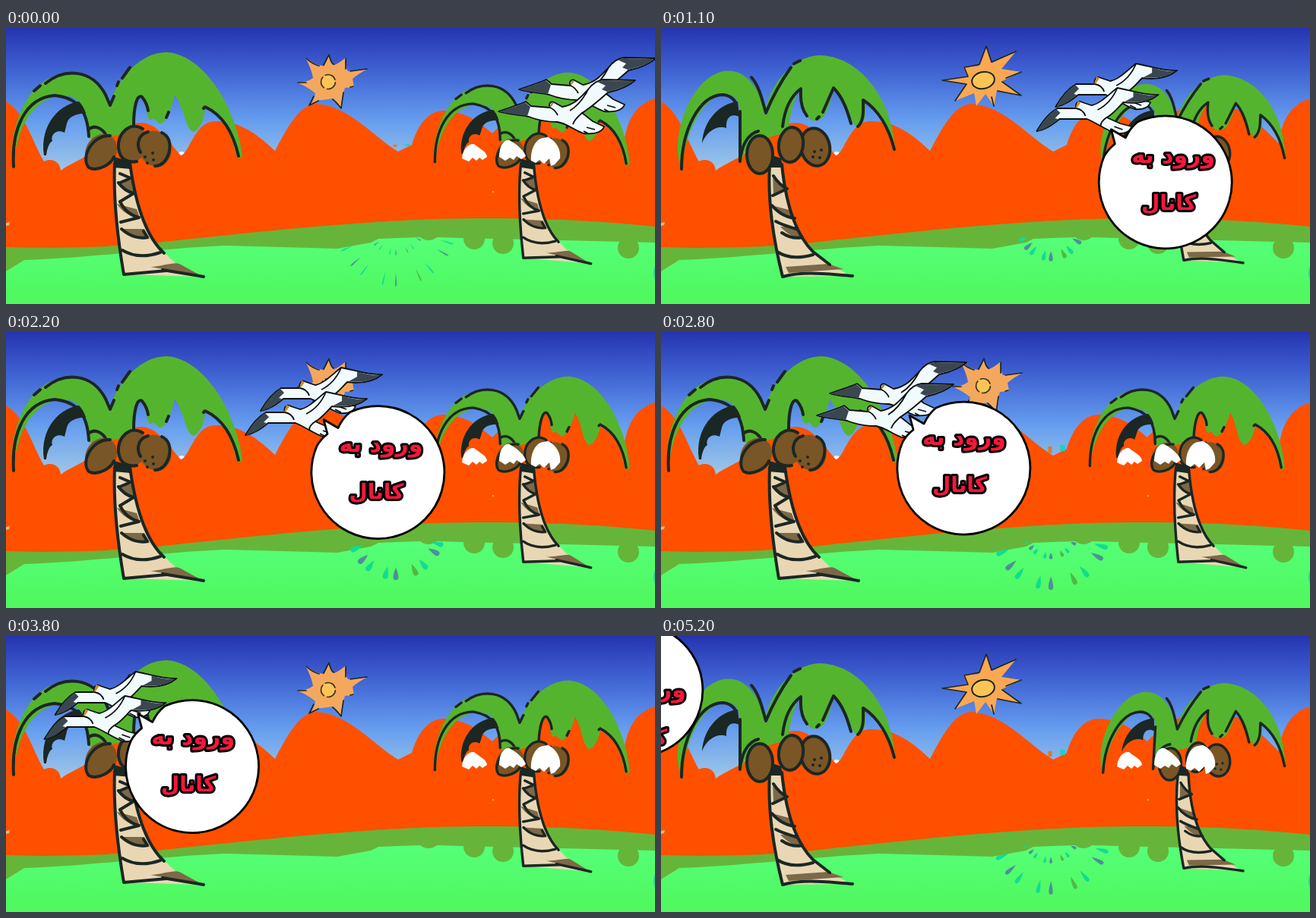
An HTML page for the animation above (5.3 s loop, 854 px wide and 364 px high).

```html
<!DOCTYPE html>
<html lang="fa">
<head>
<meta charset="utf-8">
<title>Palm landscape</title>
<style>
html, body { margin: 0; width: 100%; height: 100%; overflow: hidden; background: #53fe6a; }
svg { display: block; width: 100%; height: 100%; }
.ink { fill: none; stroke: #1b2724; stroke-width: 4; stroke-linecap: round; stroke-linejoin: round; }
.thin { stroke-width: 1.7; }
.leaf { fill: #55b42e; }
.dark { fill: #1b2724; }
.nut { fill: #7a5525; }
.trunk { fill: #e9d7b4; }
.band { fill: #7d6848; }
.bird { fill: #f1fafc; stroke: #0b0f10; stroke-width: 1.8; stroke-linejoin: round; }
.tip { fill: #3b4750; }
.line { fill: none; }
.words { font: bold 30px "DejaVu Sans", sans-serif; fill: #f5173c; stroke: #000; stroke-width: 6px;
  stroke-linejoin: round; paint-order: stroke; text-anchor: middle; direction: rtl; }
.words .small { font-size: 28px; }
</style>
</head>
<body>
<svg viewBox="0 0 854 364" preserveAspectRatio="none">
<defs>
  <linearGradient id="sky" gradientUnits="userSpaceOnUse" x1="0" y1="0" x2="0" y2="190">
    <stop offset="0" stop-color="#2634b0"/>
    <stop offset=".3" stop-color="#4063d3"/>
    <stop offset=".65" stop-color="#669eef"/>
    <stop offset="1" stop-color="#a0c8e6"/>
  </linearGradient>
  <linearGradient id="grass" x1="0" y1="0" x2="0" y2="1">
    <stop offset="0" stop-color="#55ff78"/>
    <stop offset="1" stop-color="#4ff85c"/>
  </linearGradient>
  <clipPath id="lawn"><rect x="400" y="277" width="230" height="87"/></clipPath>

  <g id="tree0">
    <path class="dark" d="M50 168C44 128 70 98 102 96L106 113C94 112 82 117 80 126L77 138C66 132 58 142 61 149C56 152 54 160 53 168Z"/>
    <path class="leaf" d="M10 183C2 150 18 96 45 74C75 50 118 54 137 100C146 66 178 32 211 32C260 34 302 104 311 167C310 174 304 173 303 168C296 135 280 108 262 104C262 120 254 136 246 137C236 132 234 104 222 88C219 104 212 124 204 126C197 126 197 116 191 121C184 120 186 104 178 92C168 94 168 118 168 133C150 142 130 146 110 146C109 118 104 96 84 90C40 84 14 128 10 183Z"/>
    <path class="trunk" d="M143 178L163 178C168 215 180 268 204 292L228 315L260 328L155 325C148 280 140 225 143 178Z"/>
    <path class="band" d="M147 203C155 214 164 217 169 218L166 200ZM146 232C155 246 169 250 176 250L172 239ZM152 265C164 276 178 280 189 278L182 265ZM190 315C206 314 222 308 228 311L259 328L228 322Z"/>
    <path class="ink" d="M143 178C141 225 147 278 155 325L211 320M163 178C170 230 184 275 208 297M206 319L260 328M145 180L160 178M148 204C155 214 164 217 168 218L150 229C157 243 167 248 175 250L151 256M152 265C164 276 177 278 186 276L181 268M153 293C168 302 186 302 203 296M150 192L164 198L150 204"/>
    <path class="ink" d="M10 183C7 135 24 92 64 89C94 92 107 108 109 143M37 83L45 76M52 73C75 54 112 52 131 88L137 102L142 90M146 76L148 71M153 66L163 52M168 128C168 106 172 86 179 91C184 97 186 102 187 109M211 118L214 111M260 106L262 104C288 116 300 142 306 169M108 134C118 126 128 134 132 142"/>
    <ellipse class="nut" cx="125" cy="163" rx="20" ry="24" transform="rotate(28 125 163)"/>
    <ellipse class="nut" cx="196" cy="159" rx="21" ry="24" transform="rotate(-25 196 159)"/>
    <ellipse class="nut" cx="166" cy="153" rx="20" ry="24" transform="rotate(12 166 153)"/>
    <path class="ink" d="M137 142C115 140 97 170 109 184C120 190 138 180 142 170M180 133C163 122 146 140 148 158C150 174 160 178 172 176M187 137C174 140 171 154 177 164M205 138C214 142 218 152 214 166C210 177 204 182 196 182M183 170L183 170M193 165L193 165M194 174L194 174M186 178L186 178"/>
    <path class="dark" d="M142 170L164 176L164 186L142 184Z"/>
  </g>

  <g id="tree1">
    <path class="dark" d="M54 152C56 122 76 100 101 97L103 117C92 112 85 118 86 132C76 128 61 134 54 152Z"/>
    <path class="leaf" d="M27 186C14 158 27 104 52 76C78 46 120 46 137 110C144 74 172 38 208 36C260 36 304 92 308 160C300 130 286 104 268 95C272 112 267 130 259 131C249 128 247 96 228 79C222 102 216 121 206 122C192 126 184 106 184 82C172 96 168 124 168 138C150 140 138 146 128 150C116 150 111 160 106 176C100 145 110 106 98 92C72 74 34 116 27 186Z"/>
    <path class="trunk" d="M143 180L159 180C163 225 176 270 198 292L222 312L250 327L160 328C150 285 139 235 143 180Z"/>
    <path class="band" d="M147 194C152 206 164 210 165 214L148 220ZM146 234C156 246 168 250 176 251L169 240ZM157 262C166 272 176 277 184 276L177 262ZM164 315L220 311L240 318L168 323Z"/>
    <path class="ink" d="M143 180C140 230 148 280 160 328C190 320 220 325 252 327M159 180C164 230 177 272 200 295L222 312M143 181L159 180M148 195C155 206 162 210 166 212L147 221M146 234C156 246 168 250 176 251M151 255C160 260 172 263 180 266M159 270C168 276 178 278 186 276M153 295C166 304 182 304 200 299"/>
    <path class="ink" d="M27 186C27 135 50 90 80 88C90 88 96 94 98 98M104 110L104 176C106 155 114 140 128 136M119 65C129 76 133 94 138 112C147 90 158 70 171 52M175 47L183 43M160 130C162 112 168 92 184 80M184 82C183 100 187 110 192 116M205 120L208 117M213 111L227 79C240 92 246 112 250 126M259 130C268 122 266 105 266 95C286 108 300 132 307 160"/>
    <g class="ink" style="fill:#7a5525">
      <ellipse cx="130" cy="167" rx="17" ry="25"/>
      <ellipse cx="203" cy="157" rx="19" ry="25" transform="rotate(-12 203 157)"/>
      <ellipse cx="171" cy="154" rx="16" ry="23" transform="rotate(8 171 154)"/>
    </g>
    <path class="ink" d="M202 163V163M211 161V161M209 171V171M200 170V170"/>
    <path class="dark" d="M147 168L158 172L160 184L144 184Z"/>
  </g>

  <g id="bird0">
    <path class="bird" d="M0 0C12-4 30-10 36-13L43-7L68-5C65-10 69-15 75-11L84-6C100-9 108-18 118-29C124-37 130-41 138-42L180-41C172-34 158-28 144-25C134-16 120-4 110 2L124 13L139 20C136 28 124 30 112 29C100 25 90 16 78 14C60 14 50 11 40 7C25 4 12 4 0 0Z"/>
    <path class="tip" d="M1 0C12-3 30-9 35-12L42-6L38 6C25 4 12 3 1 0ZM130-39L138-41L177-40C170-33 157-29 143-26L136-29L141-34Z"/>
    <path class="bird line" d="M68-5C73-3 76 1 78 5M118-29C113-19 104-7 94-1M110 2C102 9 99 13 98 17M116 21L127 24M112 26L118 29"/>
    <path d="M67-5L70-12L73-11L69-6Z" fill="#a87c34"/>
  </g>
  <g id="bird1">
    <path class="bird" d="M0 0C8-14 16-24 27-30L52-30C50-36 54-42 60-38L72-34C84-36 96-50 106-57C120-55 140-47 160-48C148-38 130-36 114-38C106-30 100-22 92-18L110-10L125-6C122 2 114 4 104 3C90-2 80-10 66-16C50-16 40-16 30-16C20-8 12-2 0 0Z"/>
    <path class="tip" d="M1 0C8-13 16-23 26-29L31-24L24-17L28-16C20-8 12-3 1 0ZM127-52C138-48 148-47 157-47C148-39 130-37 116-39L127-45Z"/>
    <path class="bird line" d="M52-30C58-29 62-26 64-20M106-57C101-45 92-34 80-28M92-18C86-14 84-10 84-7M102-6L113-2M98-2L106 2"/>
    <path d="M51-30L54-40L58-38L54-32Z" fill="#c98b2e"/>
  </g>
</defs>

<rect width="854" height="200" fill="url(#sky)"/>
<circle cx="231" cy="167" r="4" fill="#f4f8fa"/>
<path fill="#ff5000" d="M0 97C24 110 34 148 50 176C60 171 71 176 72 188C85 178 100 174 112 164C135 140 158 124 180 125C204 128 218 156 230 168C240 168 248 123 275 123C310 122 335 144 354 162C368 135 386 100 408 100C450 102 482 142 516 163L534 154C540 132 554 109 576 109C606 110 622 124 640 139C660 118 690 98 720 98C765 100 790 130 813 152C817 120 830 100 854 93V300H0Z"/>
<path d="M0 257L5 256L4 260L0 261Z" fill="#e0c088"/>
<circle cx="641" cy="216" r="1.2" fill="#e0b080"/>
<path fill="#66b53a" d="M0 289C60 291 130 290 200 283C290 273 390 262 500 255C640 247 760 252 854 262V364H0Z"/>
<path fill="url(#grass)" d="M0 321L24 306C110 303 190 292 286 287C340 288 390 290 436 291L480 283L490 278L545 276Q556 284 567 276L600 277L854 283V364H0Z"/>
<g fill="#66b53a"><circle cx="616" cy="278" r="14"/><circle cx="654" cy="284" r="14"/><circle cx="819" cy="290" r="14"/></g>
<path d="M854 314Q850 322 854 333Z" fill="#28d49a"/>

<g class="pose">
  <path fill="#f4a85e" d="M425 35Q427 45 432 49Q439 46 447 39Q446 50 450 57L476 54Q464 60 456 67L458 78L446 79Q441 92 441 106Q434 97 429 93Q419 95 412 95L399 103Q406 95 407 86Q396 77 383 72Q396 72 404 66Q402 54 394 39Q406 49 418 50Z"/>
  <path class="ink thin" d="M425 35Q427 45 431 48M447 40L447 54M453 57L475 54M457 77L453 78M444 85L441 106Q434 97 430 94M411 96L399 102L405 90M384 72L395 72M395 40Q402 47 412 50M418 49L424 37"/>
  <circle cx="424" cy="71" r="9.5" fill="#fbc455" stroke="#3c3422" stroke-width="1.7" stroke-dasharray="17 3"/>
</g>
<g class="pose">
  <path fill="#faa852" d="M428 24L435 46L467 31L448 54L474 58L449 70L475 89L442 82L438 103L427 87L415 103L412 86L387 96L402 74L369 69L403 64L398 52L418 50Z"/>
  <path class="ink thin" d="M428 24L419 48L399 52L404 64L370 69L402 74L387 96M428 24L435 45L467 31M449 71L474 89L443 83M438 103L435 91M474 58L454 66"/>
  <ellipse cx="424" cy="69" rx="15" ry="11" transform="rotate(-12 424 69)" fill="#fbc455" stroke="#1b2724" stroke-width="2"/>
</g>

<g id="burst" clip-path="url(#lawn)"></g>
<g id="sparks"><rect x="-2.5" y="-5" width="5" height="11" fill="#e07a20"/><rect x="13" y="-8" width="7" height="11" rx="2" fill="#1fd0c4"/></g>

<g class="pose"><use href="#tree0"/><use href="#tree0" transform="rotate(3.2 690 178) translate(556 29) scale(.85 .845)"/></g>
<g class="pose"><use href="#tree1"/><use href="#tree1" transform="rotate(3.2 690 178) translate(559 29) scale(.85 .845)"/></g>

<path fill="#fff" d="M600 172C601 160 608 152 616 153C621 158 633 163 633 170L627 174L623 171L619 175L614 171L609 176L604 174ZM649 170C649 156 655 146 662 148C671 152 682 162 684 169L678 173L672 169L668 174L663 171L657 175ZM691 175C690 160 697 146 707 145L713 144C721 147 731 158 729 172L722 180L717 182L715 172L708 179L702 174L697 178Z"/>

<use id="back"/>
<use id="front"/>
<g id="bubble">
  <path d="M-66-51L-71-70L-52-59Q-46-72-36-80A87.5 87.5 0 1 1-80-35Q-75-44-66-51Z" fill="#fff" stroke="#000" stroke-width="2.8" stroke-linejoin="round"/>
</g>
<g id="label" class="words"><text y="7">ورود به</text><text class="small" x="-6" y="69">کانال</text></g>
</svg>
<script>
const $ = id => document.getElementById(id);
const NS = "http://www.w3.org/2000/svg";
const LOOP = 5300, STEP = 100, POSE = 98, FLAP = 195;

// step, head x, bubble x/y, label x/y, gap between birds
const keys = [
  [0, 718, 945, 235, 958, 201, 27],
  [7, 617, 730, 214, 743, 180, 26],
  [16, 465, 580, 191, 588, 160, 23],
  [28, 275, 398, 180, 399, 142, 17],
  [34, 173, 310, 173, 311, 140, 15],
  [43, 21, 163, 172, 165, 130, 13],
  [52, -180, -33, 72, -22, 74, 13]
];
const bursts = [-4, 4.8, 10, 15.3, 20.3, 25.3, 33.3, 38.2, 43.5, 49];
const slate = "#4f8f98", teal = "#12dc92", olive = "#52b845";
const rays = [[-66, teal], [-49, slate], [-36, teal], [-13, teal], [0, slate],
  [25, olive], [39, teal], [61, slate], [73, teal]];

const poses = [...document.querySelectorAll(".pose")];
const drops = [1, .48].flatMap(reach => rays.map(([angle, color]) => {
  const el = document.createElementNS(NS, "path");
  el.setAttribute("d", "M0-9C2-4 4 1 4 5A4 4 0 0 1-4 5C-4 1-2-4 0-9Z");
  el.setAttribute("fill", color);
  $("burst").append(el);
  return { el, angle, reach };
}));

const move = (el, x, y) => el.setAttribute("transform", `translate(${x} ${y})`);
const show = (el, on) => el.style.display = on ? "" : "none";

function at(n) {
  const i = Math.max(1, keys.findIndex(k => k[0] >= n));
  const a = keys[i - 1], b = keys[i], f = (n - a[0]) / (b[0] - a[0]);
  return a.map((v, j) => v + (b[j] - v) * f);
}

function drawBurst(n) {
  const age = n - bursts.filter(s => s <= n).pop();
  const live = age < 4.5;
  const width = age < 2.2 ? .4 + age * .27 : Math.max(.1, 1 - (age - 2.2) * .42);
  const radius = 70 * (1 - (1 - Math.min(age, 3) / 3) ** 2);
  for (const { el, angle, reach } of drops) {
    show(el, live && (reach === 1 || age > 2.5));
    const a = angle * Math.PI / 180, r = radius * reach;
    const size = reach * Math.min(1, .5 + age * .25);
    el.setAttribute("transform",
      `translate(${513 + r * Math.sin(a)} ${262 + r * Math.cos(a)}) rotate(${-angle}) scale(${width * Math.sqrt(reach)} ${size})`);
  }
  show($("sparks"), live && age > 2);
  $("sparks").setAttribute("transform", `translate(512 155) scale(1 ${width})`);
}

function draw(time) {
  const n = Math.floor(time % LOOP / STEP), t = n * STEP;
  const pose = Math.floor(t / POSE) % 2, flap = Math.floor(t / FLAP) % 2;
  const [, head, bx, by, lx, ly, gap] = at(n);
  poses.forEach((el, i) => show(el, i % 2 === pose));
  drawBurst(n);
  const x = head - (flap ? 55 : 70), y = flap ? 136 : 110;
  for (const id of ["back", "front"]) $(id).setAttribute("href", "#bird" + flap);
  move($("back"), x + gap, y - (flap ? 32 : 29));
  move($("front"), x, y);
  move($("bubble"), bx, by);
  move($("label"), lx, ly);
}

const start = performance.now();
function tick() {
  draw(performance.now() - start);
  requestAnimationFrame(tick);
}
tick();
</script>
</body>
</html>
```
